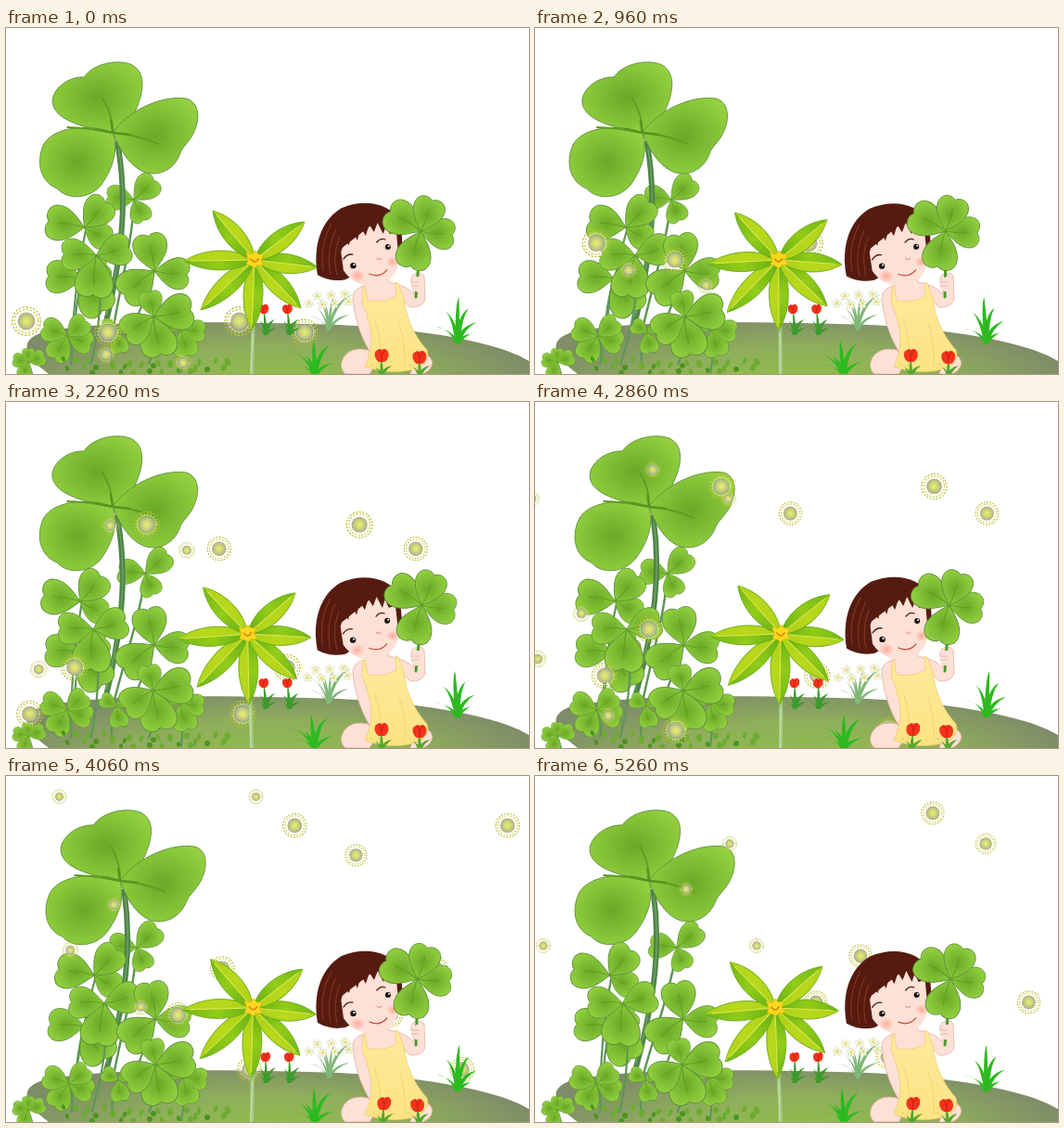
An HTML page that plays this animation: 564x373 px, repeating every 5360 ms.

```html
<!DOCTYPE html>
<html lang="en">
<head>
<meta charset="utf-8">
<title>Clover garden</title>
<style>
  html, body { margin: 0; width: 100%; height: 100%; overflow: hidden; background: #fff; }
  svg { display: block; width: 100vw; height: 100vh; }
</style>
</head>
<body>
<svg id="stage" viewBox="0 0 564 373" fill="none" stroke-linecap="round" stroke-linejoin="round">
  <defs>
    <radialGradient id="leafFill" cx=".5" cy=".5" r=".58">
      <stop offset="0" stop-color="#6aa826"/><stop offset=".6" stop-color="#82c136"/><stop offset="1" stop-color="#94d040"/>
    </radialGradient>
    <radialGradient id="glow">
      <stop offset="0" stop-color="#e6f07a"/><stop offset=".5" stop-color="#cfd674"/><stop offset="1" stop-color="#a9ac94"/>
    </radialGradient>
    <radialGradient id="soil" gradientUnits="userSpaceOnUse" cx="290" cy="385" r="290" gradientTransform="matrix(1 0 0 .26 0 285)">
      <stop offset="0" stop-color="#8fc048"/><stop offset=".55" stop-color="#8fae5c"/><stop offset="1" stop-color="#7f8c68"/>
    </radialGradient>
    <linearGradient id="petalFill" x1="0" y1="1" x2="0" y2="0">
      <stop offset="0" stop-color="#5fae14"/><stop offset=".5" stop-color="#93cc18"/><stop offset="1" stop-color="#6fb816"/>
    </linearGradient>
    <radialGradient id="blush">
      <stop offset="0" stop-color="#ffab98"/><stop offset="1" stop-color="#ffab98" stop-opacity="0"/>
    </radialGradient>
    <linearGradient id="dress" x1="0" y1="0" x2="0" y2="1">
      <stop offset="0" stop-color="#fdea9c"/><stop offset="1" stop-color="#fce383"/>
    </linearGradient>
    <path id="leaf" d="M0 0C-7-7-19-17-18-29C-17-40-6-42 0-37C6-42 17-40 18-29C19-17 7-7 0 0Z" fill="url(#leafFill)" stroke="#5f9138" stroke-width=".9"/>
    <g id="tulip">
      <path d="M-7-4Q-3-8 0-6Q4-9 7-4Q9 3 3 7H-3Q-9 3-7-4Z" fill="#f5331c"/>
      <path d="M-3-6Q1-2 0 6M4-6Q1-3 0 2" stroke="#c81c10"/>
    </g>
    <g id="fly">
      <circle r="9" fill="url(#glow)"/>
      <circle r="12" stroke="#cdd43a" stroke-width="1.6" stroke-dasharray=".6 3.2"/>
      <circle r="14.6" stroke="#b9bd3c" stroke-width="1.3" stroke-dasharray="1.2 2.6"/>
      <circle r="10.5" stroke="#fff" stroke-opacity=".6"/>
    </g>
  </defs>

  <path d="M46 373C18 352 14 336 40 328C110 313 250 317 360 320C450 325 530 338 564 359V373Z" fill="url(#soil)"/>
  <g id="clovers"></g>
  <g id="tufts"></g>
  <g id="flies"></g>
  <g id="meadow"></g>

  <g id="flower"></g>

  <g id="girl">
    <g fill="#fde0d6" stroke="#e3a999" stroke-width=".7">
      <path d="M392 373H366Q358 366 364 355Q372 343 390 347L402 356Z"/>
      <path d="M436 373L442 350Q458 350 460 361Q458 371 448 373Z"/>
      <path d="M389 268L391 277Q376 279 374 289C375 310 382 333 393 350L405 344L398 318L426 292L436 301Q448 302 452 293L451 267Q446 262 439 266Q435 271 438 277L440 287Q432 277 413 274L411 265Z"/>
    </g>
    <path d="M387 278L390 294Q407 297 421 289L420 274L423 275L429 291C431 312 441 333 454 347Q458 357 446 366Q418 376 387 365Q398 342 392 320Q389 305 384 296L385 279Z" fill="url(#dress)" stroke="#e9c65c" stroke-width=".6"/>
    <path d="M398 316Q407 342 402 365M424 318Q432 343 430 364" stroke="#f0d06a" stroke-width=".8"/>
    <g id="head">
      <path d="M336 266C331 238 338 208 362 194C386 184 414 188 426 209L428 238L366 271Q350 274 336 266Z" fill="#561b10"/>
      <path d="M361 238L364 261Q374 277 397 279Q419 274 424 252L421 218L400 208Z" fill="#fde0d6"/>
      <path d="M361 242Q358 226 367 208L404 199L421 220L414 222L410 213L407 222L401 210L397 220L392 212L388 224L383 215L379 229L374 218L370 234L366 228Z" fill="#561b10"/>
      <path d="M342 261Q338 234 351 211M350 266Q345 240 356 217M357 266Q352 244 360 225" stroke="#7e3520" stroke-width="1.2"/>
      <ellipse cx="379" cy="267" rx="8" ry="7" fill="url(#blush)"/>
      <ellipse cx="417" cy="252" rx="7" ry="6" fill="url(#blush)"/>
      <path d="M364 249Q368 243 374 244M400 231Q404 226 409 228" stroke="#561b10" stroke-width="1.3"/>
      <path d="M400 248Q403 251 405 248" stroke="#d9907e"/>
      <path d="M392 265Q403 270 411 261" stroke="#c04b3a" stroke-width="1.2"/>
      <g fill="#1c1210"><circle cx="374.500" cy="256" r="3.200"/><circle cx="412" cy="236" r="3"/></g>
      <g fill="#fff"><circle cx="375.500" cy="255" r="1.100"/><circle cx="413" cy="235" r="1"/></g>
    </g>
    <g id="held"></g>
    <path d="M437 280Q436 271 443 268Q451 267 451 277L449 283Q442 287 437 280Z" fill="#fde0d6"/>
    <path d="M437 274H445M437 278H445" stroke="#e3a999" stroke-width=".7"/>
  </g>
  <g id="front"></g>
</svg>

<script>
const $ = id => document.getElementById(id);
const TAU = Math.PI * 2;
const wave = (n, period, peak = 0) => Math.cos(TAU * (n - peak) / period);
const movers = [];

// Adds markup to a layer; pose(n) gives its transform at step n.
function add(layer, markup, pose) {
  const g = document.createElementNS('http://www.w3.org/2000/svg', 'g');
  g.innerHTML = markup;
  $(layer).append(g);
  if (pose) movers.push([g, pose]);
}

// Horizontal shear that shifts height y by dx and keeps height base fixed.
const lean = (dx, y, base) => {
  const k = dx / (y - base);
  return `matrix(1 0 ${k} 1 ${-k * base} 0)`;
};
const line = (d, color, w) => `<path d="${d}" stroke="${color}" stroke-width="${w}"/>`;

// leaves: [angle, length] pairs
function clover(x, y, leaves) {
  return `<g transform="translate(${x} ${y})">` + leaves.map(([a, len]) =>
    `<g transform="rotate(${a}) scale(${len / 40})"><use href="#leaf"/>` +
    line('M0 0Q2-14 0-27', '#62a024', 1.2) + '</g>').join('') + '</g>';
}

function grass(x, y, tips, color, w) {
  return tips.map(([dx, dy]) => {
    const cx = x + dx * .25, cy = y + dy * .85;
    return `<path d="M${x - w} ${y}Q${cx - w} ${cy} ${x + dx} ${y + dy}Q${cx + w} ${cy + 3} ${x + w} ${y}Z" fill="${color}"/>`;
  }).join('');
}

const slow = n => 1 - wave(n, 36);
const mid = n => wave(n, 28, 9.3);
const quick = n => wave(n, 13.5, 2.5);
const big = n => 4 - 4 * wave(n, 12, 11.3);

// Clover patch
const stem = '#5f9557';
add('clovers', line('M138 188C136 230 124 275 116 322', stem, 2.5) +
  clover(138, 185, [[155, 26], [-84, 30], [46, 32]]), n => lean(7.5 * slow(n), 185, 330));
add('clovers',
  line('M120 124C130 180 128 235 106 325', '#4f8449', 6) +
  line('M121 130C130 180 127 235 108 310', '#74a568', 1.2) +
  ['M115 113C85 108 47 99 50 76C54 60 72 52 84 53C92 40 116 33 134 39C151 47 149 68 139 90C133 98 121 105 115 113Z',
   'M115 113C130 90 166 72 194 76C209 80 210 100 200 117C194 126 190 129 188 134C182 153 164 161 148 155C132 148 122 130 115 113Z',
   'M115 113C95 104 52 104 40 126C31 148 39 167 55 173C66 186 92 185 104 167C118 146 120 128 115 113Z']
    .map(d => `<path d="${d}" fill="url(#leafFill)" stroke="#5f8f3a" stroke-width=".9"/>`).join('') +
  line('M66 107Q92 108 115 113Q115 94 104 76M115 113Q137 114 164 125', '#5f9d24', 1.8) +
  line('M96 109L115 113L113 100M115 113L133 115', '#579420', 2.6), n => lean(big(n), 113, 325));

const patch = [
  [86, 215, 3, 9, 'M88 215Q76 270 72 330', [[118, 31], [-80, 42], [40, 38]]],
  [82, 270, 1, 2, 'M82 270Q74 300 74 335', [[62, 32], [148, 44], [-86, 39]]],
  [100, 245, 1, 7, 'M102 245Q108 300 92 362', [[186, 46], [-88, 38], [76, 38]]],
  [160, 262, .5, 1, 'M160 262Q142 310 128 350', [[-128, 44], [96, 38], [-10, 41]]],
  [120, 328, 0, 1, 'M120 328Q112 350 115 363', [[170, 23], [-60, 19], [60, 21]]],
  [190, 325, 0, 2, 'M190 325Q193 350 189 371', [[168, 30], [-60, 30], [95, 26]]],
  [160, 311, 0, 1.5, 'M160 311Q165 338 154 362', [[170, 44], [-122, 38], [80, 43], [-10, 28]]],
  [67, 332, 0, 1, 'M67 332Q74 348 70 362', [[110, 28], [-148, 30], [50, 27], [-70, 29]]],
  [24, 360, 0, 0, 'M24 360L28 373', [[200, 18], [-80, 17], [70, 19], [0, 15]]]
];
for (const [x, y, off, amp, d, leaves] of patch)
  add('clovers', line(d, stem, 2.2) + clover(x, y, leaves), n => lean(off + amp * mid(n), y, 373));

// Sprouts on the ground
let sprouts = '';
for (let i = 0; i < 28; i++) {
  const x = 62 + (i * 71) % 182, y = 357 + (i * 37) % 16;
  sprouts += `<ellipse cx="${x}" cy="${y}" rx="${2 + i % 2}" ry="${3 + i % 3 * .6}" fill="${i % 3 ? '#6cab30' : '#4a9420'}" transform="rotate(${i * 47 % 60 - 30} ${x} ${y})"/>`;
}
add('tufts', sprouts);

// Fireflies share two rising paths: [step, dx, dy]
const wide = [[0, 0, 0], [10, 44, -84], [16, 76, -130], [29, 179, -225], [37, 249, -254], [46, 341, -270], [53, 407, -276]];
const steep = [[0, 0, 0], [10, -7, -91], [16, -7, -146], [29, 19, -279], [37, 56, -341], [46, 126, -399], [53, 179, -434]];

function along(path, n, c) {
  let i = 0;
  while (i < path.length - 2 && n > path[i + 1][0]) i++;
  const slope = j => {
    const p = path[Math.max(0, j - 1)], q = path[Math.min(path.length - 1, j + 1)];
    return (q[c] - p[c]) / (q[0] - p[0]);
  };
  const a = path[i], b = path[i + 1], h = b[0] - a[0], u = (n - a[0]) / h;
  const s = u * u * (3 - 2 * u);
  return a[c] + (b[c] - a[c]) * s + h * u * (1 - u) * (slope(i) * (1 - u) - slope(i + 1) * u);
}

function fly(path, x, y, scale, size) {
  add('flies', '<use href="#fly"/>', n =>
    `translate(${x + scale * along(path, n, 1)} ${y + scale * along(path, n, 2)}) scale(${size * (1 - n * .004)})`);
}
for (const [x, y] of [[22, 316], [-56, 470], [-104, 520], [-27, 579]])
  for (const dx of [0, 229.5]) fly(wide, x + dx, y, 1, 1.05);
for (const x of [110, 322]) fly(wide, x, 328, .924, .95);
for (const x of [191, -21]) fly(steep, x, 361, .92, .62);
for (const [x, y] of [[108, 352], [31, 507], [-16, 556], [60, 617], [-170, 617]]) fly(steep, x, y, 1, .67);

// Small blooms and grass behind the girl
let daisies = grass(348, 326, [[-25, -32], [-14, -38], [-5, -30], [6, -37], [16, -32], [26, -39], [-20, -16], [22, -17]], '#7fb878', 1.3);
for (const [x, y] of [[326, 297], [335, 289], [341, 298], [350, 288], [354, 297], [365, 287], [369, 295]])
  for (let k = 0; k < 5; k++)
    daisies += `<ellipse cx="${x}" cy="${y - 2.6}" rx="1.5" ry="2.6" fill="#fbfae4" stroke="#c3cf9a" stroke-width=".4" transform="rotate(${k * 72} ${x} ${y})"/>` +
      (k < 4 ? '' : `<circle cx="${x}" cy="${y}" r="1.3" fill="#ecd94e"/>`);
add('meadow', daisies, n => lean(quick(n), 290, 326));

for (const x of [278, 303.5])
  add('meadow', grass(x + 2, 331, [[-2, -26], [-12, -10], [-8, -17], [10, -17], [12, -8], [5, -14]], '#3c9a2c', 1.6) +
    `<use href="#tulip" transform="translate(${x} 303) scale(.72)"/>`, n => lean(.25 * big(n) - .2, 303, 331));

const blades = [[3, -50], [-23, -19], [21, -22], [-12, -35], [13, -37], [-17, -8], [15, -10]];
const sway = (x, y) => n => `rotate(${3.4 * quick(n) - 3.2} ${x} ${y})`;
add('meadow', grass(487, 340, blades, '#2dba20', 2.4), sway(487, 340));

// Yellow-green flower
const tips = [[-3, 76], [-58, 54], [50, 52], [-76, 1], [68, 8], [54, -41], [-45, -53]];
add('flower', line('M267 255Q267 320 265 373', '#a5ca84', 4) + line('M266 330L264 373', '#c9e0ae', 1.2) +
  '<g transform="translate(268 250)">' + tips.map(([x, y]) => {
    const len = Math.hypot(x, y), a = Math.atan2(x, -y) * 360 / TAU;
    const side = w => `C${w} ${-len * .25} ${w} ${-len * .7} 0 ${-len}`;
    return `<g transform="rotate(${a})">
      <path d="M0 0${side(14)}C-14 ${-len * .7} -14 ${-len * .25} 0 0Z" fill="url(#petalFill)" stroke="#6aa51c" stroke-width=".8"/>
      <path d="M0 0${side(13)}Z" fill="#c5dc1c" opacity=".75"/>` + line(`M0 0V${-len * .9}`, '#e3e653', 1) + '</g>';
  }).join('') +
  '<path d="M-9-8L-3-6L1-10L4-6L10-6L7 0L10 6L3 6L0 9L-4 6L-9 5L-7 0Z" fill="#f8d91e" stroke="#d8b012" stroke-width=".7"/>' +
  line('M-4-1Q0 5 4-1', '#d98a12', 1.8) + '</g>',
  n => `rotate(${-2.1 * slow(n)} 265 373)`);

// Held clover
add('held', line('M442 290Q444 268 445 232', '#4e9a30', 3) +
  clover(446, 219, [[195, 42], [96, 37], [-58, 42], [20, 38]]),
  n => `rotate(${-.3 - 2.4 * mid(n)} 442 290)`);
movers.push([$('head'), n => `rotate(${.7 * quick(n) - .5} 405 276)`]);

// Foreground
add('front', grass(333, 375, [[0, -38], [-26, -27], [18, -33], [-20, -14], [20, -13], [-11, -23]], '#2dba20', 2.4), sway(333, 373));
for (const [x, y, dir] of [[405, 353, .35], [446, 355, -.3]])
  add('front', grass(x, 375, [[-13, -13], [11, -11], [0, -18]], '#55a82c', 1.8) +
    `<use href="#tulip" transform="translate(${x} ${y})"/>`, n => lean(dir * big(n), y, 385));

const LOOP = 5360, STEP = 100, LEAD = 40;
function draw(now) {
  const n = Math.floor((now % LOOP + LEAD) / STEP);
  for (const [el, pose] of movers) el.setAttribute('transform', pose(n));
}
const start = performance.now();
function tick() {
  draw(performance.now() - start);
  requestAnimationFrame(tick);
}
tick();
</script>
</body>
</html>
```
